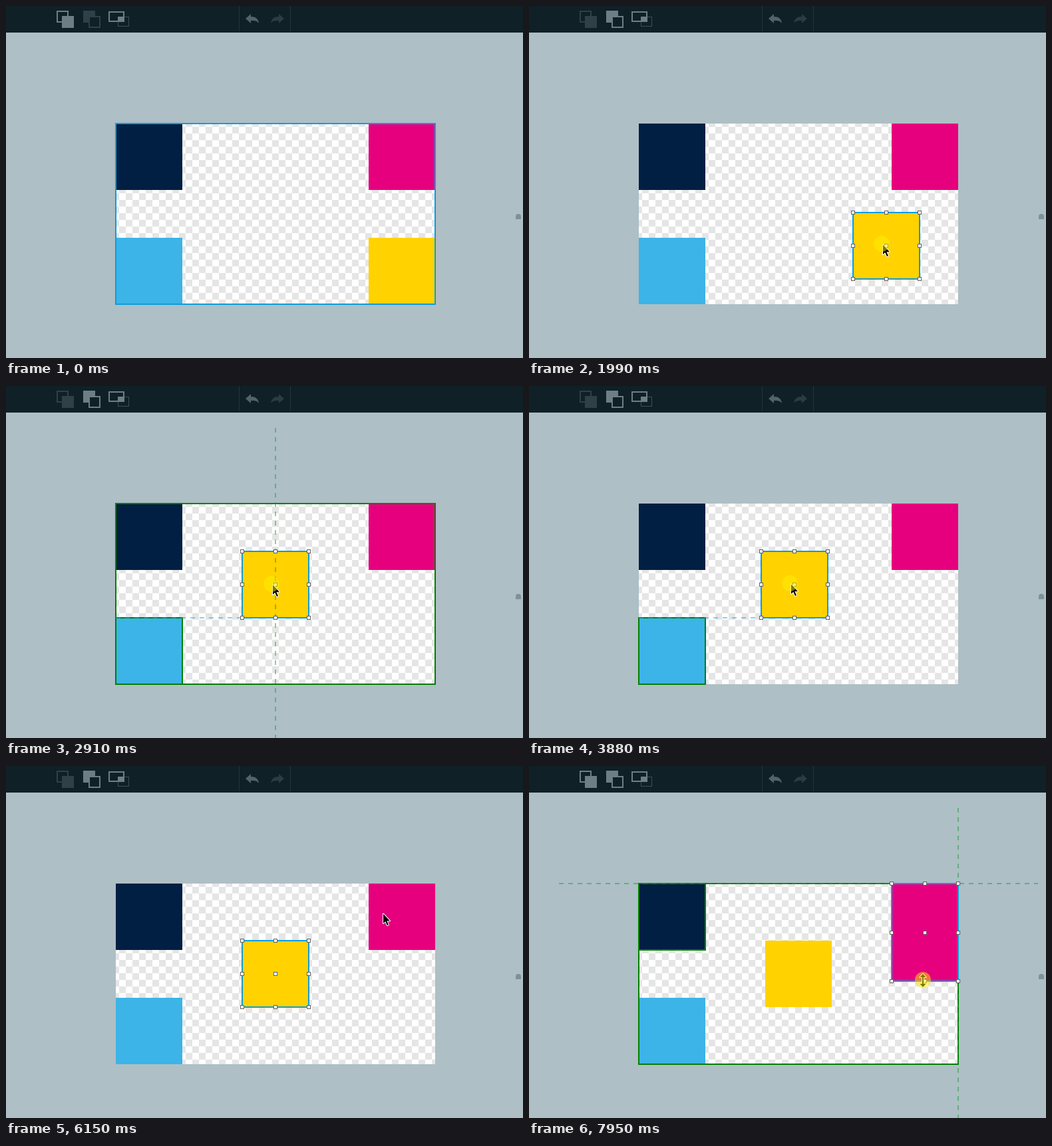
Animation, 777 px wide and 530 px high, one loop 8 s. Source, as an HTML page with a canvas:

```html
<!DOCTYPE html>
<html lang="en">
<head>
<meta charset="utf-8">
<title>Snapping guides</title>
<style>
html, body { margin: 0; width: 100%; height: 100%; overflow: hidden; background: #aebfc6; }
canvas { display: block; width: 777px; height: 530px; }
</style>
</head>
<body>
<canvas id="stage" width="777" height="530"></canvas>
<script>
const g = document.getElementById('stage').getContext('2d');
const LOOP = 8000;
const BLUE = '#0d9cdc', GREEN = '#008000', GUIDE = '#149c28';
const BAR = '#0f2127', BRIGHT = '#6d7f86', DIM = '#2f4148';

const board = { x: 165, y: 177, w: 480, h: 272 };
const navy = { x: 165, y: 177, w: 100, h: 100, fill: '#001f42' };
const pink = { x: 545, y: 177, w: 100, h: 100, fill: '#e6007e' };
const cyan = { x: 165, y: 349, w: 100, h: 100, fill: '#3cb4e7' };
const gold = { x: 545, y: 349, w: 100, h: 100, fill: '#ffd200' };

const PRESS = 1430, DRAG = 1480, DROP = 5130;
const PICK = 6460, UNPICK = 6640, SIZING = 7200, STRETCH = 7670;

// Pointer: time, x, y, optional easing into the point
const path = [
  [360, 774, 499], [970, 588, 397, 'out'], [1430, 588, 397], [1560, 586, 395],
  [1700, 571, 384], [2400, 474, 323], [2910, 400, 299], [3040, 393, 297],
  [3140, 391, 297, 'out'], [3600, 391, 297], [3600, 391, 298], [3750, 391, 298],
  [4160, 400, 299, 'inout'], [4440, 400, 299], [4670, 400, 309, 'out'],
  [DROP, 400, 309], [DROP, 390, 302], [5360, 390, 302], [5360, 397, 297],
  [5670, 397, 297], [5800, 422, 287], [6150, 566, 222], [6280, 591, 218, 'out'],
  [PICK, 591, 218], [UNPICK, 591, 219], [7250, 593, 272, 'inout'],
  [7300, 593, 272], [7400, 593, 274], [STRETCH, 593, 275], [7950, 592, 323, 'out']
];
const easing = {
  out: k => 1 - (1 - k) * (1 - k),
  inout: k => k * k * (3 - 2 * k)
};

// Snap positions of the dragged square, with what lights up at each
const snapX = [
  { at: 545, lines: [545, 595], guide: 645, lit: [pink, board] },
  { at: 445, lines: [545], lit: [pink] },
  { at: 355, lines: [], guide: 405, lit: [board] }
];
const snapY = [
  { at: 349, lines: [349, 399], guide: 449, lit: [cyan, board], from: 165, to: 0 },
  { at: 277, lines: [277], lit: [navy, pink], from: 135, to: 675 },
  { at: 263, lines: [], guide: 313, lit: [board] },
  { at: 249, lines: [349], lit: [cyan], from: 165, to: 0 }
];

function pointer(t) {
  let i = 0;
  while (i < path.length - 1 && path[i + 1][0] <= t) i++;
  const a = path[i], b = path[i + 1];
  if (!b) return { x: a[1], y: a[2] };
  let k = (t - a[0]) / (b[0] - a[0]);
  if (b[3]) k = easing[b[3]](k);
  return { x: Math.round(a[1] + (b[1] - a[1]) * k), y: Math.round(a[2] + (b[2] - a[2]) * k) };
}

const nearest = (list, v) => list.find(s => Math.abs(s.at - v) <= 5);

function box(x, y, w, h, fill) {
  g.fillStyle = fill;
  g.fillRect(x, y, w, h);
}

function frame(r, color, width = 2) {
  g.strokeStyle = color;
  g.lineWidth = width;
  g.strokeRect(r.x, r.y, r.w, r.h);
}

function dash(x1, y1, x2, y2, color) {
  g.save();
  g.globalAlpha = 0.48;
  g.strokeStyle = color;
  g.lineWidth = 2;
  g.setLineDash([7, 7]);
  g.beginPath();
  g.moveTo(x1, y1);
  g.lineTo(x2, y2);
  g.stroke();
  g.restore();
}

const guideX = x => dash(x, 63, x, 530, GUIDE);
const guideY = y => dash(45, y, 765, y, GUIDE);

function shape(d, x, y, fill, stroke) {
  const p = new Path2D(d);
  g.save();
  g.translate(x, y);
  if (stroke) {
    g.strokeStyle = stroke;
    g.lineWidth = 2;
    g.lineJoin = 'round';
    g.stroke(p);
  }
  g.fillStyle = fill;
  g.fill(p);
  g.restore();
}

function toolbar(raise, lower) {
  box(0, 0, 777, 40, BAR);
  const up = raise ? BRIGHT : DIM, down = lower ? BRIGHT : DIM;
  frame({ x: 77, y: 8, w: 16, h: 16 }, up);
  box(84, 15, 18, 18, up);
  box(116, 7, 18, 18, down);
  box(124, 15, 18, 18, BAR);
  frame({ x: 125, y: 16, w: 16, h: 16 }, down);
  frame({ x: 155, y: 9, w: 22, h: 14 }, BRIGHT);
  box(168, 16, 10, 8, BRIGHT);
  g.setLineDash([1, 1]);
  frame({ x: 168.5, y: 16.5, w: 16, h: 14 }, BRIGHT, 1);
  g.setLineDash([]);
  box(350, 0, 1, 38, '#23353c');
  box(427, 0, 1, 38, '#23353c');
  const arrow = 'M0 7 L8 0 V4 C15 4 19 7 20 14 C17 10 14 10 8 10 V14 Z';
  shape(arrow, 360, 12, '#52646b');
  g.save();
  g.translate(418, 12);
  g.scale(-1, 1);
  shape(arrow, 0, 0, '#2b3d44');
  g.restore();
}

function checker() {
  g.save();
  g.beginPath();
  g.rect(board.x, board.y, board.w, board.h);
  g.clip();
  box(board.x, board.y, board.w, board.h, '#fff');
  for (let r = -1; r < 28; r++)
    for (let c = -1; c < 48; c++)
      if ((r + c) % 2 !== 0) box(170 + c * 10, 182 + r * 10, 10, 10, '#e5e5e5');
  g.restore();
}

function select(r) {
  frame(r, BLUE);
  for (let i = 0; i < 3; i++)
    for (let j = 0; j < 3; j++) {
      const x = Math.round(r.x + r.w * i / 2), y = Math.round(r.y + r.h * j / 2);
      box(x - 3, y - 3, 6, 6, '#606060');
      box(x - 2, y - 2, 4, 4, '#fff');
    }
}

function drawPointer(t, p) {
  if (t < 360) return;
  if (t >= SIZING)
    shape('M0 -10 L4.5 -5 H1 V5 H4.5 L0 10 L-4.5 5 H-1 V-5 H-4.5 Z', p.x, p.y, '#000', '#fff');
  else
    shape('M1 0.5 V15 L4.2 12 L7 18 L9 17.2 L6.4 11.2 H11 Z', p.x, p.y, '#000', '#fff');
  const held = t >= PRESS && t < DROP || t >= PICK && t < UNPICK || t >= STRETCH;
  if (held) {
    g.fillStyle = 'rgba(255,240,0,.5)';
    g.beginPath();
    g.arc(t >= SIZING ? p.x : p.x - 1, p.y - 1, 12, 0, 7);
    g.fill();
  }
}

function draw(t) {
  const p = pointer(t);
  const dragging = t >= DRAG && t < DROP, stretching = t >= STRETCH;
  let sx, sy;

  gold.x = 545;
  gold.y = 349;
  if (dragging) {
    sx = nearest(snapX, p.x - 44);
    sy = nearest(snapY, p.y - 48);
    gold.x = sx ? sx.at : p.x - 44;
    gold.y = sy ? sy.at : p.y - 48;
  } else if (t >= DROP) {
    gold.x = 355;
    gold.y = 263;
  }
  pink.h = stretching ? Math.max(100, p.y + 1 - pink.y) : 100;

  box(0, 0, 777, 530, '#aebfc6');
  toolbar(t < PRESS || t >= PICK, t >= PRESS);
  shape('M0 8 V4 A4 4 0 0 1 8 4 V8 Z', 766, 313, '#7f9199');
  checker();
  for (const r of [navy, cyan, pink, gold]) box(r.x, r.y, r.w, r.h, r.fill);

  const lit = stretching ? [navy, board] : [...(sx ? sx.lit : []), ...(sy ? sy.lit : [])];
  for (const r of lit) frame(r, GREEN);
  if (stretching) {
    guideX(645);
    guideY(177);
  }
  if (sx) {
    for (const x of sx.lines) dash(x, 177, x, gold.y + 100, BLUE);
    if (sx.guide) guideX(sx.guide);
  }
  if (sy) {
    for (const y of sy.lines) dash(sy.from, y, sy.to || gold.x + 100, y, BLUE);
    if (sy.guide) guideY(sy.guide);
  }

  if (t < PRESS) frame(board, BLUE);
  else select(t < PICK ? gold : pink);
  drawPointer(t, p);
}

const start = performance.now();
function tick() {
  draw((performance.now() - start) % LOOP);
  requestAnimationFrame(tick);
}
tick();
</script>
</body>
</html>
```
